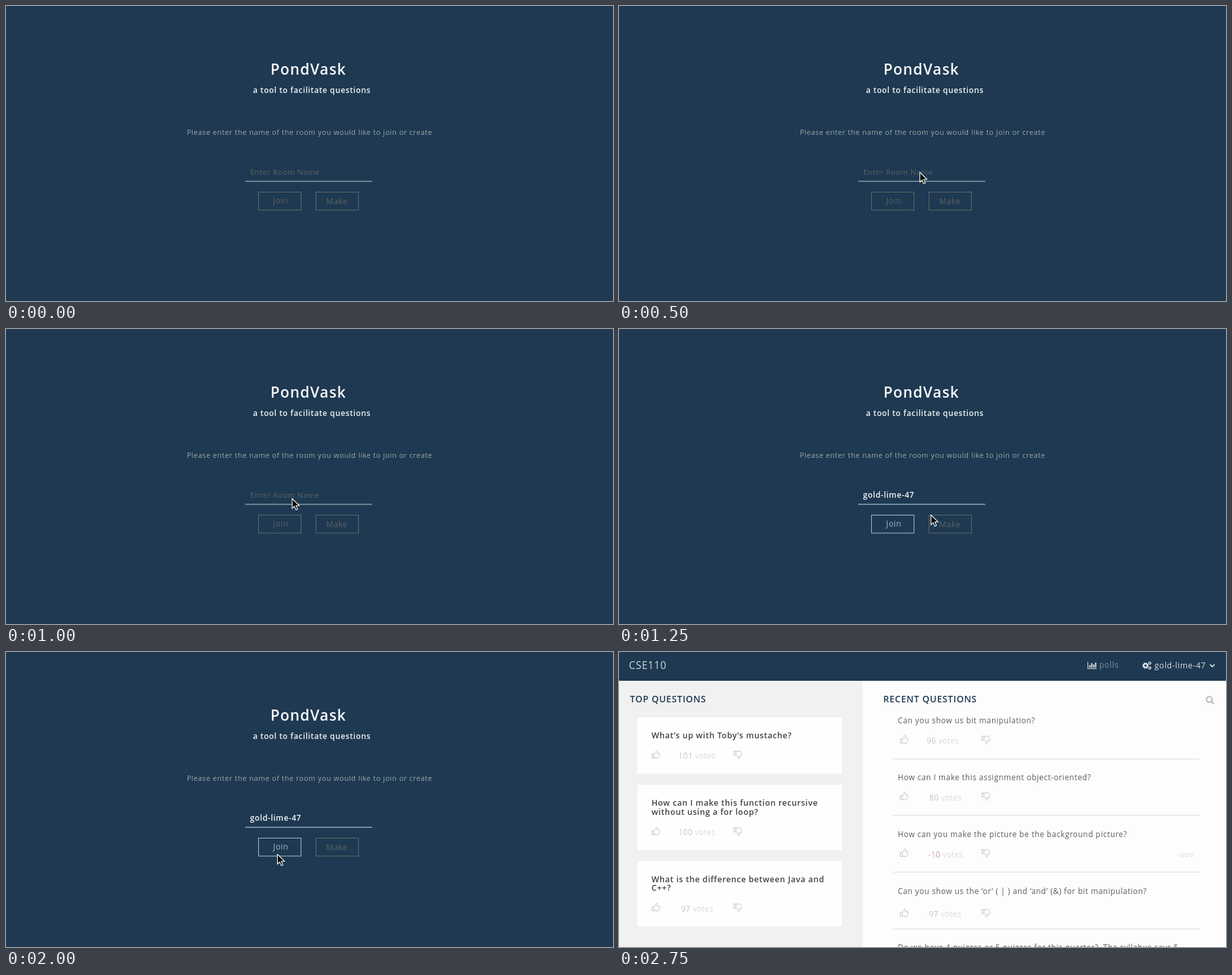
An HTML page for the animation above (3250 ms loop, 929 px wide and 451 px high).

```html
<!DOCTYPE html>
<html lang="en">
<head>
<meta charset="utf-8">
<title>Question room</title>
<style>
  html, body { margin: 0; height: 100%; overflow: hidden; background: #1e3951; }
  svg { display: block; width: 929px; height: 451px; }
  text { font-family: "Open Sans", "Noto Sans", sans-serif; letter-spacing: .05em; white-space: pre; }
  .line { fill: none; stroke: #c2c2c2; stroke-width: 1; stroke-linejoin: round; }
  .off { fill: #5f6265; }
  .box { fill: none; stroke: #68686b; }
  .active .box { stroke: #a9bfce; }
  .active text { fill: #a8b8c6; }
</style>
</head>
<body>
<svg viewBox="0 0 929 451">
  <defs>
    <g id="thumb" class="line">
      <path d="M.5 6h3v6.3h-3z"/>
      <path d="M3.5 6.3C5 5.3 6 4 6.2 2.6 6.4 1 6.8.4 7.6.6 9 1 8.9 3.1 8.2 5h3c1.5 0 1.6 1.6.7 2.2.5.8.3 1.6-.4 2 .3.8 0 1.5-.6 1.8 0 1-.6 1.4-1.6 1.4H7.4C6 12.4 5 11.8 3.5 11.6"/>
    </g>
    <g id="gear">
      <circle r="2.8" fill="none" stroke="#e4e8ec" stroke-width="2"/>
      <circle r="4" fill="none" stroke="#e4e8ec" stroke-width="1.6" stroke-dasharray="1.6 1.54"/>
    </g>
  </defs>
  <g id="login"></g>
  <g id="board"></g>
  <path id="cursor" d="M.5 1.3V16.2L3.9 13 6.3 18.6 8.8 17.5 6.4 12H11.3Z" stroke="#fff" stroke-width="1.1"/>
</svg>
<script>
const LOOP = 3250, FILLED_AT = 1250, BOARD_AT = 2500;
const ROOM = "gold-lime-47";
const cursorSteps = [
  [250, 475, 229], [500, 460, 253], [750, 440, 258], [1000, 437.5, 258],
  [1250, 477, 283], [1500, 498, 301], [1750, 417, 310], [2000, 415, 308],
  [2500, 543.5, 173]
];
const CURSOR_GONE = 2750;

const $ = id => document.getElementById(id);
const text = (x, y, size, fill, str, weight = 400) =>
  `<text x="${x}" y="${y}" font-size="${size}" font-weight="${weight}" fill="${fill}">${str}</text>`;
const rect = (x, y, w, h, fill) =>
  `<rect x="${x}" y="${y}" width="${w}" height="${h}" fill="${fill}"/>`;
const button = (id, x, tx, ty, label) =>
  `<g id="${id}"><rect class="box" x="${x}" y="284.5" width="65" height="27.5"/>
   <text class="off" x="${tx}" y="${ty}" font-size="12.1">${label}</text></g>`;

// Thumbs and vote count; y is the top of the thumb-up icon
const votes = (up, down, x, y, count) =>
  `<use href="#thumb" x="${up}" y="${y}"/>
   <use href="#thumb" transform="translate(${down} ${y + 14}) scale(1 -1)"/>` +
  text(x, y + 13.3, 11.8, "#c6c6c6",
    `<tspan fill="${count < 0 ? "#bd7680" : "#a9a9a9"}">${count}</tspan> votes`, 300);

const card = (y, h, lines, x, count) =>
  rect(28, y, 313, h, "#fefefe") +
  lines.map((s, i) => text(49.7, y + 32 + i * 13.8, 12.4, "#424242", s, 600)).join("") +
  votes(50, 175.5, x, y + h - 36, count);

const question = (y, str, x, votesY, count) =>
  text(426.7, y, 11.77, "#5c5c5c", str) +
  (count === undefined ? "" :
    votes(430, 555, x, votesY, count) + rect(419, Math.floor(y + 54), 470, 1, "#dedede"));

$("login").innerHTML =
  rect(0, 0, 929, 451, "#1e3951") +
  text(404.7, 105, 22.7, "#fbfcfd", "PondVask", 600) +
  text(378, 133, 12.05, "#f1f3f5", "a tool to facilitate questions", 600) +
  text(276.7, 196.5, 11.03, "#a0a5aa", "Please enter the name of the room you would like to join or create") +
  `<g id="hint">${text(373.7, 258, 11.45, "#5f6265", "Enter Room Name")}</g>
   <g id="typed">${text(373.5, 258, 12, "#f5f7f8", ROOM, 600)}</g>
   <path id="underline" d="M366 268H560.5"/>` +
  button("join", 386.5, 408.8, 302, "Join") +
  button("make", 474.5, 490, 303.4, "Make");

$("board").innerHTML =
  rect(0, 0, 929, 451, "#fdfdfd") +
  rect(0, 44, 373, 407, "#f1f1f1") +
  rect(0, 0, 929, 44, "#1e3951") +
  text(15.2, 26, 15.4, "#d3d8dd", "CSE110") +
  `<path d="M717.5 15V25.5H731" fill="none" stroke="#d5dae0"/>
   <path d="M720.5 24V20M723.5 24V17M726.5 24V19M729.5 24V16" stroke="#d5dae0" stroke-width="2"/>` +
  text(735, 24, 12.2, "#8492a0", "polls") +
  `<use href="#gear" x="805.8" y="20.8"/>
   <use href="#gear" transform="translate(812.3 17) scale(.55)"/>
   <use href="#gear" transform="translate(812.3 24.5) scale(.55)"/>` +
  text(819.5, 24.5, 12.3, "#d9dee3", ROOM) +
  `<path d="M904.5 19L908 22.5 911.5 19" fill="none" stroke="#e4e8ec" stroke-width="1.7"/>` +
  text(16.8, 77, 13.75, "#1e3a54", "TOP QUESTIONS", 600) +
  text(404.5, 77, 13.75, "#1e3a54", "RECENT QUESTIONS", 600) +
  `<g fill="none" stroke="#b8b8b8" stroke-width="2">
   <circle cx="903.5" cy="72.5" r="4.3"/><path d="M906.7 75.7L910.5 79.5"/></g>` +
  card(100, 86, ["What’s up with Toby’s mustache?"], 91, 101) +
  card(203, 100, ["How can I make this function recursive", "without using a for loop?"], 91, 100) +
  card(319.5, 100, ["What is the difference between Java and", "C++?"], 95, 97) +
  question(109, "Can you show us bit manipulation?", 471, 127, 96) +
  question(195.7, "How can I make this assignment object-oriented?", 475, 213.5, 80) +
  question(282.5, "How can you make the picture be the background picture?", 473, 300.3, -10) +
  question(369.5, "Can you show us the ‘or’ ( | ) and ‘and’ (&amp;) for bit manipulation?", 474.5, 392, 97) +
  question(455.5, "Do we have 4 quizzes or 5 quizzes for this quarter?  The syllabus says 5") +
  [861, 868.3, 875.6].map(x => `<circle cx="${x}" cy="310.5" r="2.5" fill="none" stroke="#dcdcdc"/>`).join("");

const show = (id, on) => $(id).setAttribute("visibility", on ? "visible" : "hidden");

function draw(now) {
  const t = now % LOOP;
  const filled = t >= FILLED_AT, board = t >= BOARD_AT;
  $("login").style.display = board ? "none" : "";
  $("board").style.display = board ? "" : "none";
  show("hint", !filled);
  show("typed", filled);
  $("join").setAttribute("class", filled ? "active" : "");
  $("underline").setAttribute("stroke", filled ? "#8fadba" : "#8a9ba3");
  $("underline").setAttribute("stroke-width", filled ? 1.4 : 1.6);

  const step = cursorSteps.filter(s => s[0] <= t).pop();
  show("cursor", step && t < CURSOR_GONE);
  if (step) $("cursor").setAttribute("transform", `translate(${step[1]} ${step[2]})`);
}

function tick() {
  draw(performance.now());
  requestAnimationFrame(tick);
}
tick();
</script>
</body>
</html>
```
